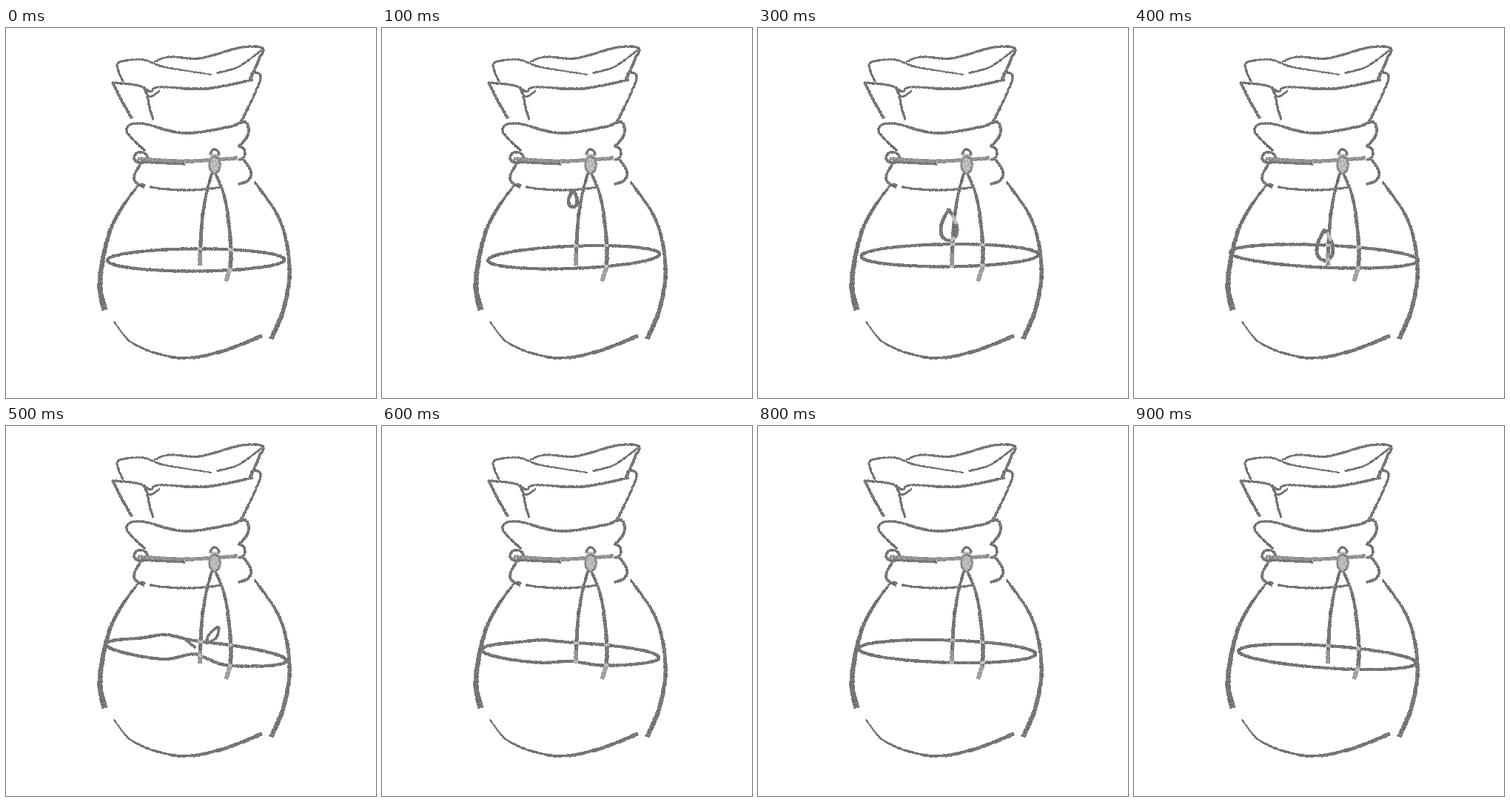
These frames come from a looping animation (500x500 px, 1000 ms). An HTML page with a canvas:

```html
<!DOCTYPE html>
<html lang="en">
<head>
<meta charset="utf-8">
<title>Pour-over</title>
<style>
  html, body { margin: 0; width: 100%; height: 100%; overflow: hidden; background: #fff; }
  canvas { position: absolute; left: 0; top: 0; }
</style>
</head>
<body>
<canvas id="jug" width="500" height="500"></canvas>
<canvas id="coffee" width="500" height="500"></canvas>
<script>
const jug = document.getElementById('jug').getContext('2d');
const coffee = document.getElementById('coffee').getContext('2d');
const { sin, cos, exp, abs, min, max, floor, hypot, PI } = Math;

const lerp = (a, b, t) => a + (b - a) * t;
const parse = s => s.split(' ').map(p => p.split(',').map(Number));
const curve = (f, n = 48) => Array.from({ length: n + 1 }, (_, i) => f(i / n));
const arc = (cx, cy, rx, ry, from = 0, to = 2 * PI) =>
  curve(t => [cx + rx * cos(lerp(from, to, t)), cy + ry * sin(lerp(from, to, t))], 24);

// Fixed grain for each pixel, 0..1
function grain(x, y) {
  const v = sin(x * 12.9898 + y * 78.233) * 43758.5453;
  return v - floor(v);
}

// Catmull-Rom through the points, sampled about every half pixel
function spline(pts) {
  const out = [], last = pts.length - 1;
  for (let i = 0; i < last; i++) {
    const b = pts[i], c = pts[i + 1];
    const a = pts[max(0, i - 1)], d = pts[min(last, i + 2)];
    const at = (k, t) => b[k] + t / 2 * (c[k] - a[k] + t * (2 * a[k] - 5 * b[k] + 4 * c[k] - d[k]
      + t * (3 * (b[k] - c[k]) + d[k] - a[k])));
    const n = Math.ceil(hypot(c[0] - b[0], c[1] - b[1]) * 2);
    for (let j = 0; j < n; j++) out.push([at(0, j / n), at(1, j / n)]);
  }
  return out;
}

// Pencil line whose width runs from w0 to w1
function pencil(ctx, path, w0, w1 = w0, tone = () => 96) {
  const pts = spline(typeof path === 'string' ? parse(path) : path);
  pts.forEach(([x, y], i) => {
    const [nx, ny] = pts[min(i + 1, pts.length - 1)], [lx, ly] = pts[max(i - 1, 0)];
    const dx = nx - lx, dy = ny - ly, len = hypot(dx, dy) || 1;
    const w = lerp(w0, w1, i / pts.length), base = tone(x, y);
    for (let o = -w / 2; o <= w / 2; o += 0.5) {
      const px = floor(x - dy / len * o), py = floor(y + dx / len * o);
      if (abs(o) > w / 2 - 0.5 && grain(px, py) > 0.7) continue;
      const v = floor(base + 45 * grain(py + 7, px));
      ctx.fillStyle = `rgb(${v},${v},${v})`;
      ctx.fillRect(px, py, 1, 1);
    }
  });
}

const leftCord = parse('278,196 269,232 264,270 262,321');
const rightCord = parse('283,196 296,232 303,285 303,322 297,342');
const cordPts = spline(leftCord).concat(spline(rightCord)).filter(p => p[1] > 240);
const overCord = (x, y) =>
  cordPts.some(p => abs(p[0] - x) < 3 && abs(p[1] - y) < 2) ? 165 : 96;

function drawJug() {
  const line = (path, w0, w1, tone = 96) => pencil(jug, path, w0, w1, () => tone);
  // paper filter
  line('158,72 152,58 152,47 172,43 190,44 215,53 278,63', 2.8, 1.6);
  line('200,46 222,39 262,41 315,27 346,27 342,42 330,69', 2.4, 3.2);
  line('285,61 315,52 345,30', 2.2);
  // funnel and spout
  line('146,74 180,78 195,86 208,80 270,82 334,70', 2.6, 3.4);
  line('329,70 334,60 344,66 335,91 318,126', 2.4, 3.2);
  line('144,73 153,92 170,122', 3);
  line('186,81 194,93 208,85', 2.4);
  line('191,92 194,108 199,124', 2.6);
  // collar and neck
  line('188,166 163,139 181,129 240,142 300,134 323,127 327,144 314,161', 2.8, 3.4);
  line('182,183 174,198 175,208 187,215', 3);
  line(arc(243, 210, 56, 9, 2.6, 0.5), 2.6);
  line('321,178 331,194 327,206 314,211', 3.2);
  // band, cords and bead
  line(arc(182, 175, 9, 7), 2.8);
  line(arc(314, 169, 9, 9, -1.5, 1.6), 2.8);
  line('178,177 245,180 313,176', 4.6, 4.6, 125);
  line('180,181 242,184', 2.6);
  line(leftCord, 3.2, 5);
  line(rightCord, 3, 5.5);
  line('262,304 262,321', 4.5, 5, 130);
  line('303,324 297,342', 5.5, 5, 140);
  line('282,170 282,194', 12, 12, 165);
  line(arc(282, 172, 6, 8, -3, 0), 2.6);
  line(arc(282, 185, 7, 11), 2.4, 2.4, 115);
  // bowl
  line('188,212 175,217 142,270 127,340 133,381', 2.4, 7.5);
  line('336,208 371,262 383,325 375,380 358,420', 2.8, 6);
  line('146,397 167,423 204,440 246,446 295,436 346,416', 1.6, 5);
}

// Coffee surface at key steps: left end x, y and right end x, y
const poses = {
  0: [137, 314, 376, 313], 2: [149, 314, 374, 298], 4: [130, 303, 384, 314],
  5: [135, 295, 379, 317], 7: [135, 310, 369, 309], 8: [136, 301, 375, 308],
  9: [141, 304, 381, 320]
};
const poseAt = step => poses[step] ||
  poses[step - 1].map((v, i) => (v + poses[step + 1][i]) / 2);

// Tilted ellipse, lifted near the middle by a splash
function surface(step) {
  const [x0, y0, x1, y1] = poseAt(step);
  const splash = max(0, 1 - abs(step - 5.2) / 1.2);
  return curve(t => {
    const a = 2 * PI * t, k = (1 - cos(a)) / 2, back = sin(a);
    const x = lerp(x0, x1, k);
    const lift = (11 - 4 * back) * exp(-(((x - 235 + 20 * (back + 0) - 0) / 26) ** 2));
    return [x, lerp(y0, y1, k) - 15 * back - splash * lift];
  });
}

// Teardrop that swells, then falls with growing speed
function drop(step) {
  const top = max(219, 210 + 3.9 * step * step), size = min(1.1, 0.2 + 0.4 * step);
  return curve(t => {
    const a = 2 * PI * t;
    return [258 - 13 * size * sin(a) * sin(a / 2), top + 19 * size * (1 - cos(a))];
  });
}

function drawCoffee(step) {
  coffee.clearRect(0, 0, 500, 500);
  const line = (path, w) => pencil(coffee, path, w, w, overCord);
  line(surface(step), 3.7);
  if (step >= 1 && step <= 4) line(drop(step), 4);
  if (step === 5) {
    line('225,284 241,288 256,300', 3.4);
    line('270,294 275,281 287,272 284,286 270,294', 3);
  }
}

drawJug();
let shown = -1;
function tick() {
  const step = floor(performance.now() % 1000 / 100);
  if (step !== shown) drawCoffee(shown = step);
  requestAnimationFrame(tick);
}
tick();
</script>
</body>
</html>
```
